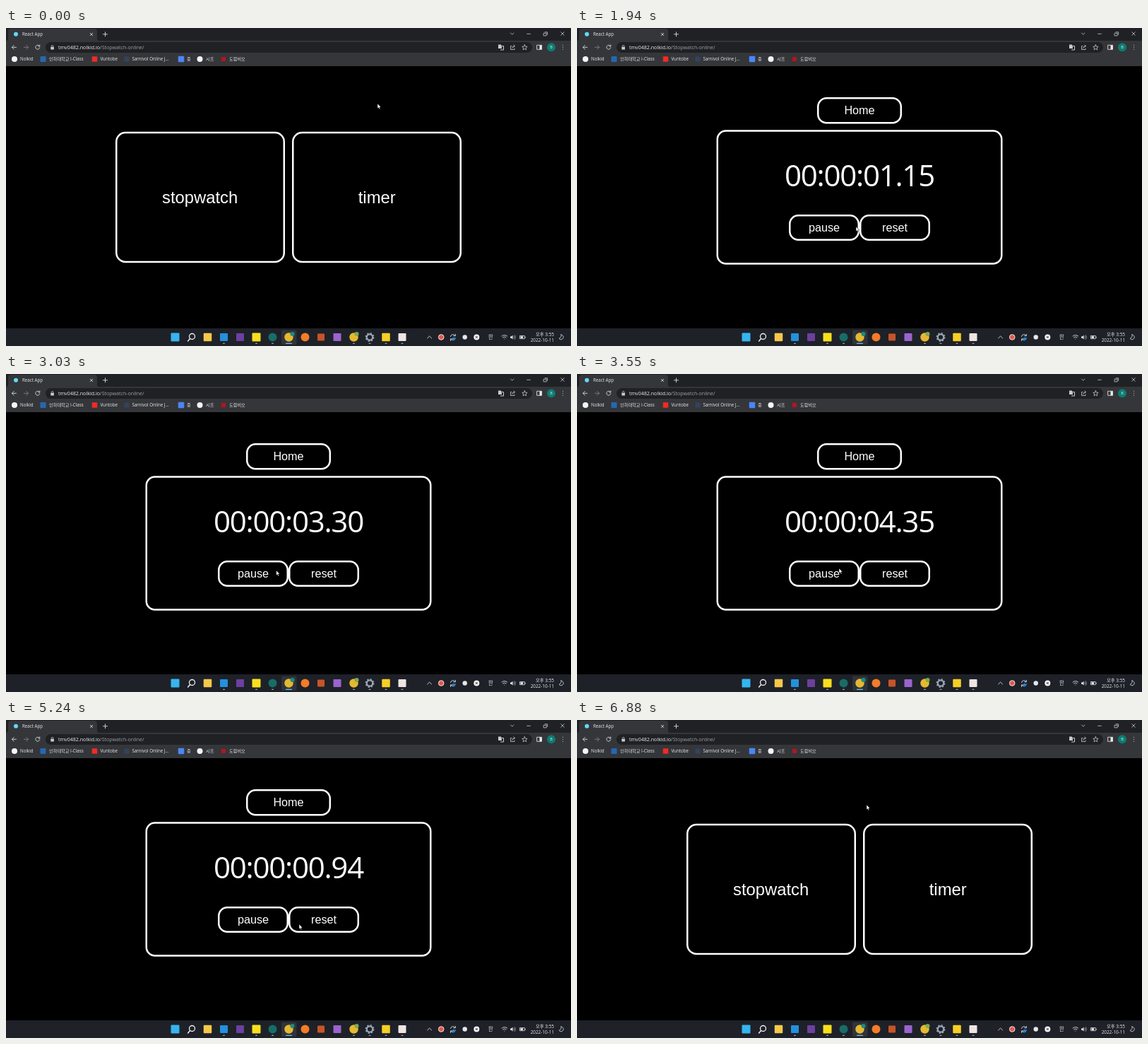
Write an HTML page that moves like this. It is 800 px wide and 450 px high and loops after 6940 ms.

```html
<!DOCTYPE html>
<html lang="ko">
<head>
<meta charset="utf-8">
<title>Stopwatch</title>
<style>
  html, body { margin: 0; width: 100%; height: 100%; overflow: hidden; background: #000; }
  svg { display: block; width: 100vw; height: 100vh; }
  text { fill: #fff; font-family: "Open Sans", "Noto Sans CJK KR", "Noto Sans CJK", sans-serif; }
  .ui { font-size: 6.2px; fill: #e8eaed; }
  .url { font-size: 7.1px; fill: #e8eaed; }
  .url .path { fill: #9aa0a6; }
  .line { fill: none; stroke: #c9cccf; stroke-width: 1; stroke-linecap: round; stroke-linejoin: round; }
  .frame { fill: #000; stroke: #fff; stroke-width: 2.5; }
  .app text { font-family: "Liberation Sans", Arial, sans-serif; font-size: 16.2px; text-anchor: middle; }
  .app .big { font-size: 23.8px; }
  .app .time { font: 42px "Open Sans", "Noto Sans", sans-serif; letter-spacing: -1.25px; text-anchor: start; }
</style>
</head>
<body>
<svg viewBox="0 0 800 450">
  <rect width="800" height="450"/>

  <!-- browser -->
  <rect width="800" height="54" fill="#35363a"/>
  <rect width="800" height="18" fill="#202124"/>
  <path d="M0 18q3 0 3-3V5q0-4 4-4H125q4 0 4 4V15q0 3 3 3Z" fill="#35363a"/>
  <circle cx="14" cy="8.8" r="3" fill="#61dafb"/>
  <text class="ui" x="23" y="11.2">React App</text>
  <rect x="56" y="20" width="689" height="15" rx="7.5" fill="#202124"/>
  <text class="url" x="74" y="30">tmv0482.nolkid.io<tspan class="path">/Stopwatch-online/</tspan></text>
  <g class="line">
    <path d="M119.3 7.2l3.4 3.4m0-3.4l-3.4 3.4M137.5 8.8h6m-3-3v6"/>
    <path d="M714.5 7l2.2 2.2L718.9 7M737.7 8.3h4.6M761.5 7.3h3.6v3.6h-3.6zM763 5.8h3.6v3.6M785.7 5.7l4.6 4.6m0-4.6l-4.6 4.6" stroke-width=".8"/>
    <path d="M14.5 27.3h-6m2.7-2.8l-2.8 2.8 2.8 2.8"/>
    <path d="M25.5 27.3h6m-2.7-2.8l2.8 2.8-2.8 2.8" stroke="#77797d"/>
    <path d="M47.2 25.3a3 3 0 1 0 .6 2.5M47.8 24v2h-2"/>
    <path d="M64.3 27v-1.3a1.3 1.3 0 0 1 2.6 0V27" stroke-width=".8"/>
    <path d="M716 25.5h-1.5v5h5.5V29M716.5 28.5q.3-3 3.8-3m-1.5-1.5l1.8 1.5-1.8 1.5" stroke-width=".8"/>
    <path d="M734.4 23.7l1.1 2.5 2.6.2-2 1.8.6 2.6-2.3-1.4-2.3 1.4.6-2.6-2-1.8 2.6-.2z" stroke-width=".8"/>
    <path d="M752 24.3h6.5v6H752z"/>
  </g>
  <rect x="63.3" y="26.7" width="4.6" height="3.8" rx=".5" fill="#c9cccf"/>
  <path d="M697 23.5h4l1.2 5.5H697z" fill="#c9cccf"/>
  <path d="M701.5 25.5h3v5.5h-4" class="line" stroke-width=".7"/>
  <path d="M755.5 24.3h3v6h-3z" fill="#e8eaed"/>
  <circle cx="772" cy="27.3" r="6" fill="#0b7d72"/>
  <text class="ui" x="772" y="29.4" text-anchor="middle" style="font-size:5.5px">B</text>
  <path d="M788.5 24.2v.1m0 2.9v.1m0 2.9v.1" class="line" stroke-width="1.5"/>
  <g id="bookmarks"></g>

  <!-- app views -->
  <g class="app" id="home">
    <rect class="frame" x="156.25" y="148" width="237.5" height="183" rx="13"/>
    <rect class="frame" x="406.25" y="148" width="237.5" height="183" rx="13"/>
    <text class="big" x="274.7" y="248">stopwatch</text>
    <text class="big" x="525.2" y="248">timer</text>
  </g>
  <g class="app" id="watch">
    <rect class="frame" x="341.25" y="99.25" width="117.5" height="35" rx="12"/>
    <text x="400" y="122.3">Home</text>
    <rect class="frame" x="198.75" y="145.5" width="402.5" height="188" rx="12"/>
    <text class="time" id="time" x="294" y="224"></text>
    <g id="single">
      <rect class="frame" x="341.25" y="265.25" width="117.5" height="34.5" rx="12"/>
      <text x="400" y="288">start</text>
    </g>
    <g id="pair">
      <rect class="frame" x="301.25" y="265.25" width="97.5" height="34.5" rx="12"/>
      <rect class="frame" x="401.25" y="265.25" width="97.5" height="34.5" rx="12"/>
      <text id="toggle" x="350" y="288"></text>
      <text x="450" y="288">reset</text>
    </g>
  </g>

  <!-- taskbar -->
  <rect y="425" width="800" height="25" fill="#1e2128"/>
  <rect x="390" y="427.5" width="21.5" height="20.5" rx="2" fill="#30333a"/>
  <g id="apps"></g>
  <g class="line">
    <circle cx="263.5" cy="436.5" r="4" stroke="#f1f1f1" stroke-width="1.3"/>
    <path d="M260.6 439.6l-3 3.4" stroke="#f1f1f1" stroke-width="1.5"/>
    <circle cx="515" cy="437.5" r="4.2" stroke="#9aa7b5" stroke-width="2.2"/>
    <circle cx="515" cy="437.5" r="5.7" stroke="#9aa7b5" stroke-width="1.5" stroke-dasharray="2.2 2.27" stroke-linecap="butt"/>
    <path d="M596.6 439l3-3 3 3"/>
    <path d="M629.5 436.5a3.5 3.5 0 0 1 6.5-1m.3 3.5a3.5 3.5 0 0 1-6.5 1M636.3 433.3v2.4h-2.4M629.5 442.5V440h2.4"/>
    <path d="M702 436a5.5 5.5 0 0 1 7.6 0m-6.1 1.9a3.3 3.3 0 0 1 4.6 0m-2.3 2.1v.1"/>
    <path d="M718.8 436a2 2 0 0 1 0 3.2m1.3-4.6a4 4 0 0 1 0 6" stroke-width=".7"/>
    <path d="M727.8 435.5h6.4v4.2h-6.4zM735.3 437v1.4" stroke-width=".9"/>
    <path d="M786 434a3.4 3.4 0 1 1-3 5.2 4 4 0 0 0 3-5.2z" stroke-width=".9"/>
  </g>
  <circle cx="633.8" cy="440" r="2.2" fill="#1b86d8"/>
  <path d="M714 436.5h1.5l2-1.8v5.8l-2-1.8H714z" fill="#e8eaed"/>
  <path d="M728.5 436.2h3.5v2.9h-3.5z" fill="#e8eaed"/>
  <circle cx="616.2" cy="437.5" r="3.8" fill="#e4574d" stroke="#f5e9e8"/>
  <circle cx="649.7" cy="437.5" r="3.2" fill="#e8e8e8"/>
  <circle cx="666.3" cy="437.5" r="4" fill="#f4f4f4"/>
  <path d="M664.9 436.1l2.8 2.8m0-2.8l-2.8 2.8" stroke="#1e2128"/>
  <text class="ui" x="686.3" y="440.2" text-anchor="middle" style="font-size:7.5px">한</text>
  <text class="ui" x="776" y="435.5" text-anchor="end" style="font-size:6.4px">오후 3:55</text>
  <text class="ui" x="776" y="444.2" text-anchor="end" style="font-size:6.4px">2022-10-11</text>

  <path id="cursor" d="M0 0v7l1.6-1.4 1.1 2.4 1.2-.5-1.1-2.4h2.1z" fill="#fff" stroke="#000" stroke-width=".5"/>
</svg>

<script>
const LOOP = 6940;
const $ = id => document.getElementById(id);

const square = (x, y, s, color) =>
  `<rect x="${x - s / 2}" y="${y - s / 2}" width="${s}" height="${s}" rx="1" fill="${color}"/>`;
const dot = (x, y, s, color) => `<circle cx="${x}" cy="${y}" r="${s / 2}" fill="${color}"/>`;

// icon shape, centre, size, colour, label, label position
$('bookmarks').innerHTML = [
  [dot, 12, 8, '#f5f5f5', 'Nolkid', 20],
  [square, 52.5, 8, '#2468b2', '인하대학교 I-Class', 61],
  [square, 125.5, 7.5, '#f02b24', 'Vuntobe', 133.5],
  [square, 171, 7, '#30445f', 'Sarnivol Online J...', 178.5],
  [square, 248, 8.5, '#4a86f5', '중', 256],
  [dot, 274.5, 8, '#f5f5f5', '시프', 283],
  [square, 308, 6, '#b9131b', '도람비오', 316]
].map(([shape, x, size, color, label, left]) =>
  shape(x, 44, size, color) + `<text class="ui" x="${left}" y="46.3">${label}</text>`).join('');

// icon shape, centre, size, colour, has a running mark
$('apps').innerHTML = [
  [square, 239.5, 12, '#35b5ee'],
  [square, 285.5, 11.5, '#f5c84c'],
  [square, 308.5, 11, '#2391dc', 1],
  [square, 331.5, 11, '#6d3f9e'],
  [square, 354.5, 12, '#f8df1d', 1],
  [dot, 377.5, 12, '#176d68', 1],
  [dot, 400.5, 12.5, '#e5b92f'],
  [dot, 423.5, 12, '#f57b28'],
  [square, 446, 10, '#c75428'],
  [square, 469, 11, '#9a64ce'],
  [dot, 492.5, 12.5, '#e5b92f', 1],
  [null, 515, 0, '', 1],
  [square, 538, 11.5, '#f6cf24', 1],
  [square, 561, 11, '#eee4e2', 1]
].map(([shape, x, size, color, running]) =>
  (shape ? shape(x, 437.5, size, color) : '') +
  (running ? `<rect x="${x - 1.5}" y="445.8" width="3" height="1.2" rx=".6" fill="#9b9ea5"/>` : '')
).join('') +
  '<rect x="396" y="445.8" width="9" height="1.3" rx=".6" fill="#5fc3f0"/>' +
  dot(405.5, 433, 6, '#1d8b7e') + dot(496.5, 433, 6, '#7ea853');

// [ms, x, y]
const pointer = [
  [0, 526, 107], [90, 526, 107], [500, 338, 222], [620, 338, 222],
  [1250, 395, 281], [2700, 395, 281], [3350, 371, 275], [3720, 371, 275],
  [4200, 415, 289], [5650, 415, 289], [6350, 410, 120], [LOOP, 410, 120]
];
// [ms, elapsed seconds]
const firstRun = [[1350, 0], [1360, 0.02], [2520, 2.28], [3550, 4.35], [3620, 4.49]];
const secondRun = [[4760, 0], [5240, 0.94], [6480, 3.4]];

const smooth = p => p * p * (3 - 2 * p);

function track(points, t, ease = p => p) {
  const last = points[points.length - 1];
  if (t >= last[0]) return last.slice(1);
  const i = Math.max(1, points.findIndex(p => p[0] > t));
  const a = points[i - 1], b = points[i];
  const p = ease(Math.max(0, (t - a[0]) / (b[0] - a[0])));
  return a.slice(1).map((v, k) => v + (b[k + 1] - v) * p);
}

function clockText(seconds) {
  const cs = Math.floor(seconds * 100 + 1e-6);
  const two = n => String(n).padStart(2, '0');
  return `00:00:${two(Math.floor(cs / 100))}.${two(cs % 100)}`;
}

const show = (id, on) => { $(id).style.display = on ? '' : 'none'; };

function draw(t) {
  const onHome = t < 600 || t >= 6480;
  const idle = t < 1350 || (t >= 4420 && t < 4760);
  const paused = t >= 3620 && t < 4420;
  show('home', onHome);
  show('watch', !onHome);
  show('single', idle);
  show('pair', !idle);
  $('toggle').textContent = paused ? 'start' : 'pause';
  $('time').textContent = clockText(idle ? 0 : track(t < 4420 ? firstRun : secondRun, t)[0]);
  $('cursor').setAttribute('transform', `translate(${track(pointer, t, smooth)})`);
}

const start = performance.now();
function tick() {
  draw((performance.now() - start) % LOOP);
  requestAnimationFrame(tick);
}
tick();
</script>
</body>
</html>
```
